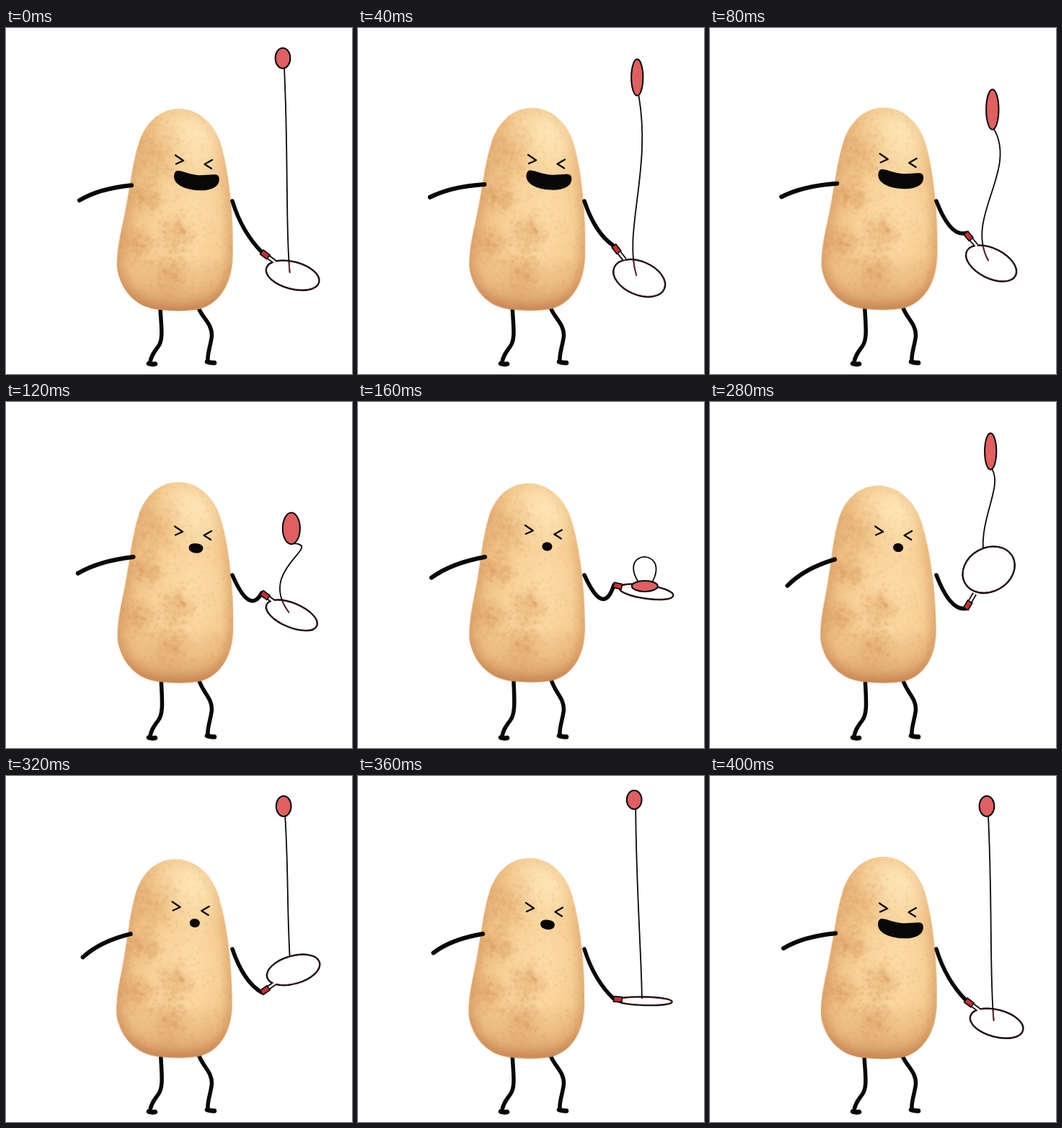
These frames come from a looping animation (480 px wide and 480 px high, 440 ms). An HTML page with a canvas:

```html
<!DOCTYPE html>
<html lang="en">
<head>
<meta charset="utf-8">
<title>Potato paddle ball</title>
<style>
  html, body { margin: 0; width: 100%; height: 100%; overflow: hidden; background: #fff; }
  canvas { display: block; width: 480px; height: 480px; }
</style>
</head>
<body>
<canvas id="stage" width="480" height="480"></canvas>
<script>
const ctx = document.getElementById('stage').getContext('2d');
const STEP = 40, STEPS = 11, SWING = 10, INK = '#080808';

const rad = deg => deg * Math.PI / 180;
const clamp = (v, low, high) => Math.min(high, Math.max(low, v));
const mod = (a, n) => (a % n + n) % n;
// Steps between two moments of the cyclic swing.
const gap = (a, b) => Math.abs(mod(a - b + SWING / 2, SWING) - SWING / 2);

function ellipse(x, y, rx, ry, angle = 0) {
  const path = new Path2D();
  path.ellipse(x, y, rx, ry, rad(angle), 0, 7);
  return path;
}

function stroke(path, width, color = INK) {
  ctx.lineWidth = width;
  ctx.strokeStyle = color;
  ctx.stroke(typeof path === 'string' ? new Path2D(path) : path);
}

function fill(path, color) {
  ctx.fillStyle = color;
  ctx.fill(path);
}

function makePotato() {
  const sheet = document.createElement('canvas');
  sheet.width = sheet.height = 480;
  const g = sheet.getContext('2d');
  const outline = new Path2D('M241 112C212 113 193 134 185 160C175 190 172 228 163 268' +
    'C157 294 154 312 154 330C157 362 180 389 214 391C232 393 252 393 268 390' +
    'C298 382 315 352 315 312C316 262 311 205 300 165C292 134 269 112 241 112Z');
  let seed = 7;
  const random = () => (seed = seed * 16807 % 2147483647) / 2147483647;
  const spread = () => random() + random() + random() - 1.5;
  const glow = (x, y, r, rgb, alpha) => {
    const shade = g.createRadialGradient(x, y, 0, x, y, r);
    shade.addColorStop(0, `rgba(${rgb},${alpha})`);
    shade.addColorStop(1, `rgba(${rgb},0)`);
    g.fillStyle = shade;
    g.fillRect(x - r, y - r, 2 * r, 2 * r);
  };
  const ramp = (x0, y0, x1, y1, ...colors) => {
    const shade = g.createLinearGradient(x0, y0, x1, y1);
    colors.forEach((color, i) => shade.addColorStop(i / (colors.length - 1), color));
    return shade;
  };

  g.clip(outline);
  g.fillStyle = ramp(155, 240, 315, 260, '#ebba7e', '#f5cc92', '#f9d49c', '#f2c68a');
  g.fillRect(0, 0, 480, 480);
  glow(265, 145, 65, '255,234,188', .8);
  glow(255, 265, 80, '255,224,172', .6);

  // Brown patches: x, y, size.
  for (const [x, y, size] of [[205, 172, 36], [182, 300, 24], [238, 285, 24], [228, 340, 28], [195, 235, 24]]) {
    glow(x, y, size * 1.3, '211,141,76', .28);
    for (let i = 0; i < 130; i++)
      glow(x + spread() * size, y + spread() * size, 1.5 + random() * 4, '204,134,70', .12);
  }
  for (let i = 0; i < 1600; i++)
    glow(150 + random() * 170, 110 + random() * 285, 1 + random() * 2.5,
      random() < .5 ? '196,130,72' : '255,230,185', .13);

  g.fillStyle = ramp(0, 315, 0, 393, 'rgba(196,122,66,0)', 'rgba(196,122,66,.2)', 'rgba(186,112,60,.6)');
  g.fillRect(0, 300, 480, 100);
  g.filter = 'blur(7px)';
  g.lineWidth = 11;
  g.strokeStyle = ramp(0, 112, 0, 392, 'rgba(222,164,98,.25)', 'rgba(205,137,82,.6)', 'rgba(190,116,66,.7)');
  g.stroke(outline);
  return sheet;
}
const potato = makePotato();

function drawBody(top, bottom, lean) {
  const hip = bottom - 4, shift = (392 - bottom) * .5;
  stroke(`M${214 + shift} ${hip}C${215 + shift} 412 219 432 211 442C206 449 201 455 200 464`, 5.5);
  stroke('M198 465.5Q202 467 207 466', 6.5);
  stroke(`M${267 + shift / 2} ${hip}C272 402 286 410 285.5 427C284 441 279 451 280 462`, 5.5);
  stroke('M279 463Q284 465 289 464.5', 6.5);

  const scale = (bottom - top) / 280, shear = (lean - shift) / 280;
  ctx.save();
  ctx.transform(1, 0, -shear, scale, shift + shear * 392, bottom - 392 * scale);
  ctx.drawImage(potato, 0, 0);
  ctx.restore();
}

function drawFace(dx, dy, laugh) {
  ctx.save();
  ctx.translate(dx, dy);
  stroke('M235 176.5L246 184L236 188.5M286 183L275.5 189L285 195', 2.3);
  ctx.restore();

  // The mouth blends from round (laugh 0) to a wide grin (laugh 1).
  const rx = 7 + 24.5 * laugh, ry = 6 + 7 * laugh;
  const mix = (round, grin) => (round + (grin - round) * laugh) * ry;
  const corner = mix(0, -.3), rise = mix(-.55, -1.35), inner = mix(-1, -.65), lip = mix(-1, -.62);
  const low = mix(.55, .5), side = rx * .6;
  ctx.save();
  ctx.translate(264 + dx / 2, 206 + dy + 6 * laugh);
  ctx.rotate(rad(6));
  fill(new Path2D(`M${-rx} ${corner}C${-rx} ${rise} ${-side} ${inner} 0 ${lip}` +
    `C${side} ${inner} ${rx} ${rise} ${rx} ${corner}` +
    `C${rx} ${low} ${side} ${ry} 0 ${ry}C${-side} ${ry} ${-rx} ${low} ${-rx} ${corner}Z`), INK);
  ctx.restore();
}

function drawArms(left, shoulder, right) {
  stroke(`M${left.x} ${left.y}Q${(left.x + shoulder.x) / 2 - 9} ${(left.y + shoulder.y) / 2 - 6} ` +
    `${shoulder.x} ${shoulder.y}`, 6);
  // The elbow sags further as the hand comes up.
  const sag = 7.5 + (311 - right.y) * .78;
  stroke(`M314 240Q${325 + sag * .3} ${(240 + right.y) / 2 + sag} ${right.x} ${right.y}`, 5.5);
}

function drawPaddle(along, head) {
  const line = (from, to) => `M${along(from).join(' ')}L${along(to).join(' ')}`;
  ctx.lineCap = 'butt';
  stroke(line(9, 24), 6.5);
  stroke(head, 4);
  fill(head, '#fff');
  stroke(head, 1, '#5c2527');
  stroke(line(9, 24), 3, '#fff3f1');
  stroke(line(-1, 12), 9);
  stroke(line(.5, 10.5), 5.5, '#c92f30');
  ctx.lineCap = 'round';
}

function draw(step) {
  const phase = 2 * Math.PI * step / SWING;
  const wave = (mean, cos, sin, cos2 = 0, sin2 = 0) => mean + cos * Math.cos(phase) +
    sin * Math.sin(phase) + cos2 * Math.cos(2 * phase) + sin2 * Math.sin(2 * phase);

  ctx.fillStyle = '#fff';
  ctx.fillRect(0, 0, 480, 480);
  ctx.lineCap = ctx.lineJoin = 'round';

  const dx = wave(-2.6, 2.6, 2.6), dy = wave(-3, 3, 0);
  drawBody(wave(113.2, -1.2, -2.6), wave(390, 2, 0), dx * 1.2 - 1);
  drawFace(dx, dy, clamp(2.12 - gap(step, 1), 0, 1));

  const hand = { x: 355, y: wave(284, 27, -10, 0, 2.5) };
  drawArms({ x: wave(103.3, -1.3, -4), y: wave(244.5, -5.5, -9) },
    { x: wave(174.7, -.5, 1.8), y: wave(217, 1.2, -1.8) }, hand);

  // The paddle turns over: a negative tilt shows its underside.
  const grip = rad(wave(2, 30, 48, 5, -4.5));
  const along = d => [hand.x + d * Math.cos(grip), hand.y + d * Math.sin(grip)];
  const tilt = wave(1, 12, 22, 5, -3), depth = Math.max(5, Math.abs(tilt));
  const [px, py] = along(39 + .8 * depth);
  const head = ellipse(px, py, 37, depth, wave(1, 14, 25, 0, -4));

  // Free flight around the highest point, stretched at speed and squashed on the paddle.
  const flight = gap(step, 9);
  const bx = wave(390.5, -6.5, 3.5), by = 33 + 8.9 * flight ** 2;
  const rx = Math.min(18, 8 + 1.4 * (flight - 2.3) ** 2) - (flight < 1 ? 5 : 0);
  const ry = Math.max(13, 28 - 4.3 * (flight - 2.8) ** 2) * (flight > 4.5 ? .57 : 1);
  const ball = ellipse(bx, by, rx, ry);

  const slack = wave(25, -19, 15), sx = bx + 2, sy = by + ry - 1, ex = px - 4, ey = py - 4;
  const cord = `M${sx} ${sy}C${sx + slack} ${sy + .65 * (ey - sy) - 60} ${ex - slack} ${ey - 60} ${ex} ${ey}`;
  if (tilt < 0) stroke(cord, 1.8);
  drawPaddle(along, head);
  if (tilt >= 0) {
    stroke(cord, 1.8);
    ctx.save();
    ctx.clip(head);
    stroke(cord, 1.8, '#69282a');
    ctx.restore();
  }
  fill(ball, '#e05f60');
  stroke(ball, 2);
}

const start = performance.now();
function tick() {
  draw(Math.floor((performance.now() - start) / STEP) % STEPS);
  requestAnimationFrame(tick);
}
tick();
</script>
</body>
</html>
```
